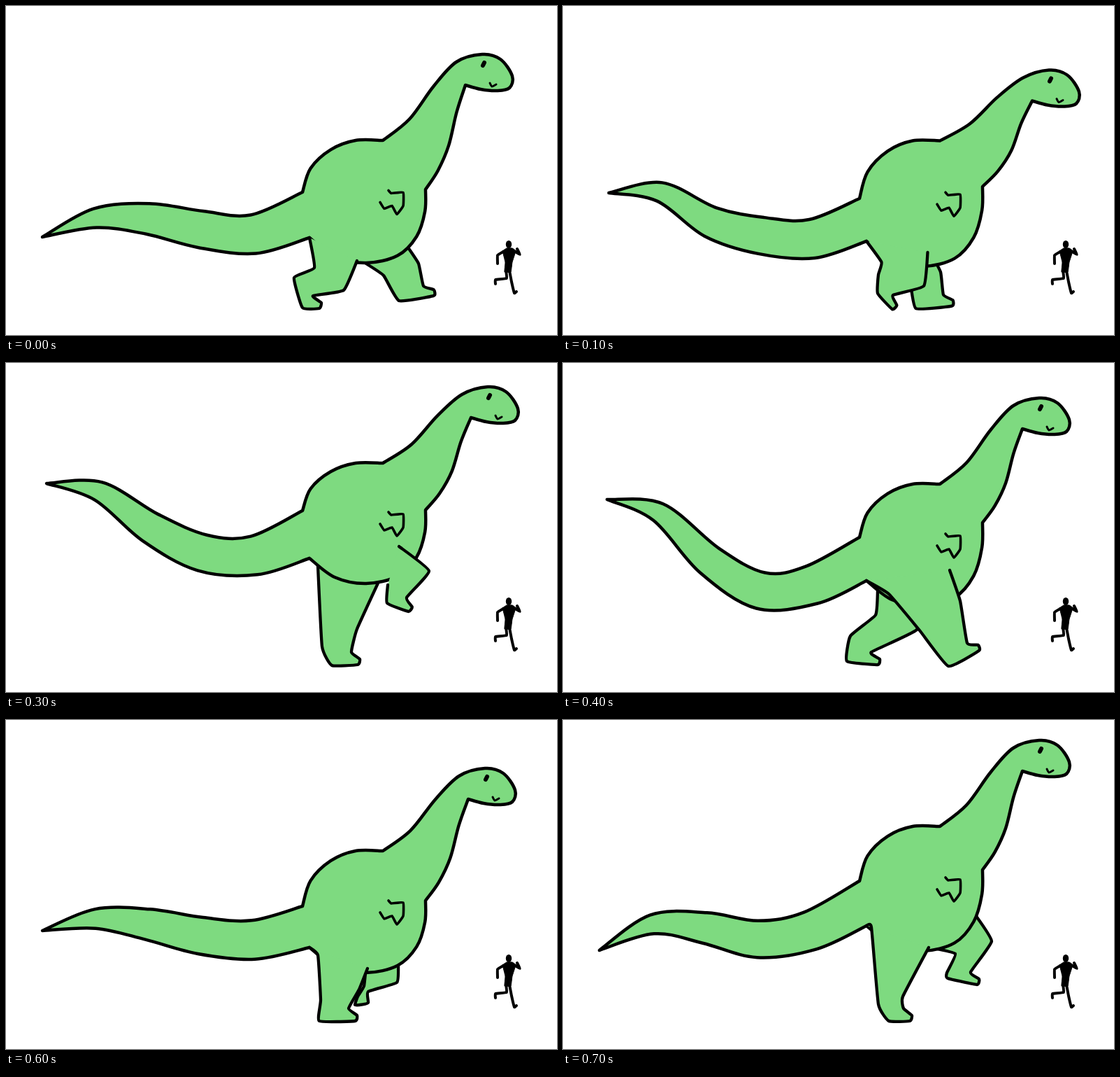
An HTML page with a canvas that plays this animation: 788 by 470 pixels, repeating every 800 ms.

```html
<!DOCTYPE html>
<html lang="en">
<head>
<meta charset="utf-8">
<title>Walking dinosaur</title>
<style>
  html, body { margin: 0; overflow: hidden; background: #fff; }
  canvas { display: block; }
</style>
</head>
<body>
<canvas id="stage" width="788" height="470"></canvas>
<script>
const ctx = document.getElementById('stage').getContext('2d');
const GREEN = '#7eda80', STEP = 100, SINK = 6;

const points = text => text.trim().split(/\s+/).map(p => p.split(',').map(Number));
const lerp = (a, b, t) => a + (b - a) * t;
const shift = (pts, [dx, dy]) => pts.map(([x, y]) => [x + dx, y + dy]);
// Points from p to q, placed at fractions of the way in x and y.
const bend = (p, q, fractions) =>
  [p, ...fractions.map(([u, v]) => [lerp(p[0], q[0], u), lerp(p[1], q[1], v)]), q];

const BACK = points('.1,.46 .35,.82 .66,1');
const NAPE = points('.36,.27 .69,.69');
const THROAT = points('.22,.26 .42,.58 .69,.82');
const BELLY = points('.01,.3 .15,.64 .47,.9');
const HEAD = points('24,-44 50,-37 67,-13 63,4 45,8 22,6 0,0');
const EYE = points('27,-32 25,-28');
const MOUTH = points('35,-3 38,2 44,-1');
const ARM = points('0,0 4,4 21,3 21,22 12,34 5,22 -6,26 -12,17');
const FOOT = points('12,10 9,18');

// A leg runs down its front, round the foot (tilted in degrees), up its back.
const leg = (front, tilt, back) => ({ front: points(front), tilt, back: points(back) });

// Levels: heights of rump, back, shoulder, chest. Tail: heights from base to tip.
const reach = {
  levels: [331, 266, 192, 262], tail: [326, 319, 304, 303], tip: [52, 330], jaw: [657, 113],
  near: leg('502,364 483,406 439,414', 0, '424,431 412,388 441,374 434,331'),
  far: leg('575,345 590,368 597,400', -20, '562,421 540,385 515,368')
};
const pass = {
  levels: [329, 272, 181, 242], tail: [327, 325, 301, 216], tip: [79, 192], jaw: [685, 146],
  near: leg('541,328 549,382 505,400', 60, '476,378 490,368 470,346 434,329'),
  far: leg('475,345 490,380 491,413', 0, '447,431 452,385 452,342')
};
const lift = {
  levels: [279, 211, 143, 210], tail: [275, 271, 235, 183], tip: [58, 172], jaw: [665, 78],
  near: leg('562,262 605,297 573,335', 20, '545,343 546,317'),
  far: leg('535,308 502,380 494,413', 0, '466,432 452,405 446,290')
};
const reach2 = {
  levels: [311, 249, 173, 228], tail: [317, 325, 282, 213], tip: [63, 195], jaw: [657, 94],
  near: leg('553,296 568,340 578,400', -30, '551,433 510,382 466,330 434,311'),
  far: leg('505,340 506,381 441,413', 0, '406,426 411,390 447,360 450,325')
};
const pass2 = {
  levels: [325, 266, 187, 258], tail: [314, 308, 292, 284], tip: [52, 301], jaw: [661, 113],
  near: leg('517,355 505,385 490,412', 0, '448,430 450,400 446,336 434,325'),
  far: leg('561,349 559,375 518,388', 50, '499,407 503,395 512,380 515,350')
};
const lift2 = {
  levels: [294, 230, 152, 214], tail: [301, 313, 297, 292], tip: [52, 329], jaw: [657, 73],
  near: leg('523,325 486,395 487,412', 0, '466,430 451,406 441,296 434,294'),
  far: leg('588,276 613,316 583,360', 0, '550,369 549,361 561,334 526,325')
};

// Halfway between two poses, number by number.
function mean(a, b) {
  if (typeof a === 'number') return (a + b) / 2;
  if (Array.isArray(a)) return a.map((v, i) => mean(v, b[i]));
  return Object.fromEntries(Object.keys(a).map(key => [key, mean(a[key], b[key])]));
}
const sink = (a, b) => ({ ...mean(a, b), drop: SINK });
const walk = [reach, sink(reach, pass), pass, lift, reach2, sink(reach2, pass2), pass2, lift2];

function tailSides(base, heights, tip) {
  const n = heights.length + 1;
  const spine = [base, ...heights.map((y, i) => [lerp(base[0], tip[0], (i + 1) / n), y]), tip];
  const side = sign => heights.map((_, i) => {
    const [a, b, c] = spine.slice(i, i + 3);
    const dx = c[0] - a[0], dy = c[1] - a[1];
    const half = sign * 28 * (1 - ((i + 1) / n) ** 3) / Math.hypot(dx, dy);
    return [b[0] + dy * half, b[1] - dx * half];
  });
  return [side(1), side(-1).reverse()];
}

function bodyRuns({ levels: [r, b, s, c], tail, tip, jaw }) {
  const rump = [434, r], back = [424, b], shoulder = [539, s], chest = [600, c];
  const [under, over] = tailSides([429, (r + b) / 2], tail, tip);
  return [
    [rump, ...under, tip],
    [tip, ...over, back],
    bend(back, shoulder, BACK),
    [...bend(shoulder, [jaw[0] - 13, jaw[1] - 33], NAPE), ...shift(HEAD, jaw)],
    bend(jaw, chest, THROAT),
    [...bend(chest, [515, r + 36], BELLY), [470, r + 27], rump]
  ];
}

function legRun({ front, tilt, back }) {
  const a = tilt * Math.PI / 180, cos = Math.cos(a), sin = Math.sin(a);
  const foot = FOOT.map(([x, y]) => [x * cos - y * sin, x * sin + y * cos]);
  return [...front, ...shift(foot, front[front.length - 1]), ...back];
}

// Splines joined at corners; k sets how round they are.
function draw(runs, k, width, fill) {
  ctx.beginPath();
  ctx.moveTo(...runs[0][0]);
  for (const pts of runs) {
    for (let i = 0; i < pts.length - 1; i++) {
      const b = pts[i], c = pts[i + 1], a = pts[i - 1] || b, d = pts[i + 2] || c;
      ctx.bezierCurveTo(
        b[0] + (c[0] - a[0]) * k, b[1] + (c[1] - a[1]) * k,
        c[0] - (d[0] - b[0]) * k, c[1] - (d[1] - b[1]) * k, c[0], c[1]);
    }
  }
  if (fill) {
    ctx.fillStyle = fill;
    ctx.fill();
  }
  ctx.lineWidth = width;
  ctx.stroke();
}

function dinosaur(p) {
  const [rump, , shoulder] = p.levels;
  draw([legRun(p.far)], 0.07, 4.3, GREEN);
  draw(bodyRuns(p), 1 / 6, 4.5, GREEN);
  draw([legRun(p.near)], 0.07, 4.3, GREEN);
  draw([shift(ARM, [547, (shoulder + rump) / 2 + 2])], 0.06, 3.6);
  draw([shift(EYE, p.jaw)], 0, 6);
  draw([shift(MOUTH, p.jaw)], 0.1, 3);
}

const TORSO = points('710,350 716,346 724,346 729,350 724,366 722,380 713,380 714,366 710,350');
const LIMBS = [
  '711,351 703,356 703,368', '727,350 735,355 731,347',
  '715,378 716,389 700,391 700,397', '720,378 723,394 727,410 730,408'
].map(points);

function runner() {
  ctx.fillStyle = '#000';
  ctx.beginPath();
  ctx.ellipse(719, 340.5, 4.2, 5.5, 0, 0, 7);
  ctx.fill();
  draw([TORSO], 0.05, 1, '#000');
  for (const limb of LIMBS) draw([limb], 0.05, 4);
}

function frame(now) {
  const p = walk[Math.floor(now / STEP) % walk.length];
  ctx.clearRect(0, 0, 788, 470);
  ctx.lineCap = ctx.lineJoin = 'round';
  ctx.save();
  ctx.translate(0, p.drop || 0);
  dinosaur(p);
  ctx.restore();
  runner();
  requestAnimationFrame(frame);
}
requestAnimationFrame(frame);
</script>
</body>
</html>
```
